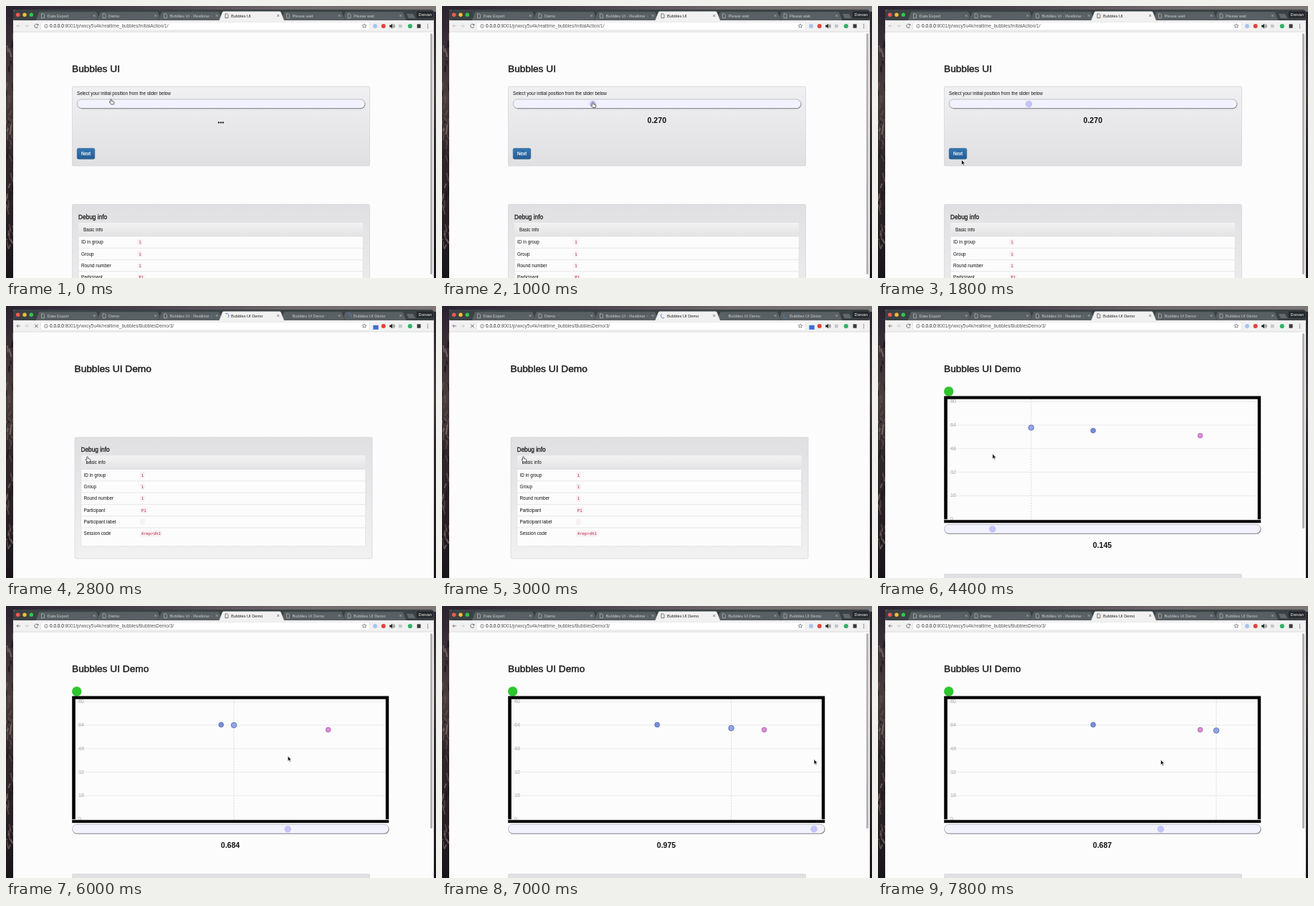
These frames come from a looping animation (600x379 px, 8 s). An HTML page:

```html
<!DOCTYPE html>
<html lang="en">
<head>
<meta charset="utf-8">
<title>Bubbles UI</title>
<style>
  html, body { margin: 0; width: 100%; height: 100%; overflow: hidden; background: #fff; }
  svg { display: block; width: 100vw; height: 100vh; }
  text { font: 6.3px "Liberation Sans", Arial, sans-serif; fill: #111; white-space: pre; }
  .title { font-size: 13.7px; fill: #1c1c1c; stroke: #1c1c1c; stroke-width: .45px; }
  .sub { font-size: 8.3px; fill: #1c1c1c; stroke: #1c1c1c; stroke-width: .28px; }
  .value { font-size: 10.6px; font-weight: bold; text-anchor: middle; }
  .code { font: 5.65px "DejaVu Sans Mono", monospace; fill: #c01f4a; }
  .tab { font-size: 5.65px; }
  .axis { font-size: 7.2px; fill: #a8a8a8; }
  .url { font-size: 6.5px; }
</style>
</head>
<body>
<svg id="stage" viewBox="0 0 600 379" preserveAspectRatio="none"></svg>
<script>
const LOOP = 8000, STEP = 200;

const rect = (x, y, w, h, fill, more = '') =>
  `<rect x="${x}" y="${y}" width="${w}" height="${h}" fill="${fill}" ${more}/>`;
const circle = (x, y, r, fill, more = '') =>
  `<circle cx="${x}" cy="${y}" r="${r}" fill="${fill}" ${more}/>`;
const path = (d, stroke, width = .8, more = 'fill="none"') =>
  `<path d="${d}" stroke="${stroke}" stroke-width="${width}" ${more}/>`;
const text = (x, y, s, cls = '', more = '') =>
  `<text x="${x}" y="${y}" class="${cls}" ${more}>${s}</text>`;
const group = (id, body, more = '') => `<g id="${id}" ${more}>${body}</g>`;
const gradient = (id, colors, dir = 'x2="0" y2="1"') =>
  `<linearGradient id="${id}" ${dir}>${colors.map((c, i) =>
    `<stop offset="${i / (colors.length - 1)}" stop-color="${c}"/>`).join('')}</linearGradient>`;
const range = n => [...Array(n).keys()];

const defs = `<defs>
  ${gradient('wall', ['#29222f', '#3b3036', '#4a3d3e', '#33292d', '#2c2428', '#241d22', '#17141a'])}
  ${gradient('wallTop', ['#29222f', '#4a434c', '#6f696b', '#7d7777'], '')}
  ${gradient('well', ['#f0f0f2', '#e0e0e2'])}
  ${gradient('debugWell', ['#e0e0e2', '#f1f1f2'])}
  ${gradient('head', ['#f2f2f3', '#e3e3e5'])}
  ${gradient('button', ['#3577b3', '#265c93'])}
</defs>`;

function wallpaper() {
  let seed = 7;
  const rnd = () => (seed = seed * 16807 % 2147483647) / 2147483647;
  const streaks = range(50).map(() => {
    const x = rnd() * 10, y = 30 + rnd() * 320;
    const tone = ['#8f7d78', '#151116', '#6a5756'][Math.floor(rnd() * 3)];
    return path(`M${x} ${y}l${rnd() * 8 - 4} ${4 + rnd() * 10}`, tone, 1 + rnd() * 1.5, 'opacity=".6"');
  }).join('');
  return rect(0, 0, 600, 379, 'url(#wall)') + rect(0, 0, 600, 8, 'url(#wallTop)') + streaks;
}

const tabX = i => 44 + 85.5 * i;

function tab(i) {
  const x = tabX(i), active = i === 3;
  const ink = active ? '#222' : '#c9cdcf';
  const shape = `M${x - 3} 20.5 L${x + 1.5} 9 Q${x + 2} 7.8 ${x + 3.5} 7.8 H${x + 81} Q${x + 82.5} 7.8 ${x + 83} 9 L${x + 87.5} 20.5Z`;
  return path(shape, active ? '#e9e9e9' : '#32373a', .5, `fill="${active ? '#f1f1f1' : '#596063'}"`)
    + group('doc' + i, path(`M${x + 5.5} 10.8h2.6l1.4 1.5v4.4h-4z`, ink, .6))
    + group('spin' + i, path(`M${x + 9.6} 16.4a3 3 0 0 1 -3 -5.4`, '#4a83d8', 1))
    + text(x + 13.6, 15.8, '', 'tab', `id="tab${i}" style="fill:${ink}"`)
    + (i === 2 ? rect(x + 70, 9, 6, 10, '#596063', 'opacity=".75"') : '')
    + path(`M${x + 77.7} 12l3 3m0-3l-3 3`, active ? '#555' : '#b3b8ba', .7);
}

function chrome() {
  const lights = ['#fb5a53', '#fdbb3b', '#32c748'].map((c, i) => circle(16.7 + 9.3 * i, 12.2, 2.7, c)).join('');
  const tabs = [0, 1, 2, 5, 4, 3].map(tab).join('');
  const nav = group('back', path('M20 27.8h-5m2-2.2l-2.2 2.2l2.2 2.2', '#666', .8))
    + path('M26 27.8h5m-2-2.2l2.2 2.2l-2.2 2.2', '#c6c6c6', .8)
    + group('reload', path('M44.6 26.4a2.6 2.6 0 1 0 .2 2.4m.1-3.8v1.9h-1.9', '#555', .8))
    + group('stop', path('M40.2 25.6l4.4 4.4m0-4.4l-4.4 4.4', '#555', .9));
  const tools = path('M500 24.8l.9 2h2.1l-1.7 1.4l.7 2.1l-2-1.3l-2 1.3l.7-2.1l-1.7-1.4h2.1z', '#555', .6)
    + group('extIdle', circle(515, 28, 3, '#a9c3ee'))
    + group('extBusy', rect(512.3, 26.8, 7.4, 6, '#3c6fd3'))
    + circle(526.7, 28, 3, '#e2433a')
    + path('M535.4 26.8h1.5l2-1.8v6l-2-1.8h-1.5z', '#222', .4, 'fill="#222"')
    + path('M540 26.4q1.4 1.6 0 3.2m1.2-4.4q2.2 2.8 0 5.6', '#222', .6)
    + rect(548, 25.7, 4.6, 4.6, '#c5c5c5') + circle(563.8, 28, 3.1, '#32b368')
    + rect(573.6, 25.3, 5, 5.4, '#3a3a3a')
    + [25.6, 28, 30.4].map(y => circle(588.5, y, .7, '#555')).join('');
  return rect(10, 5, 587, 380, '#fdfcfd', 'rx="3"') + rect(10, 5, 587, 16, '#3b4144', 'rx="3"')
    + lights + rect(573, 7.5, 23, 9, '#24282a', 'rx="1"')
    + text(584.7, 14, 'Dorvan', 'tab', 'text-anchor="middle" style="fill:#fff"')
    + path('M559 11h9l3 6h-9z', '#555c5f', .5, 'fill="#62696c"')
    + tabs + rect(10, 20, 587, 15.8, '#f1f1f1') + path('M10 36H597', '#c9c9c9', .6)
    + rect(48.5, 22.3, 459, 11.4, '#fff', 'rx="1.5" stroke="#d4d4d4" stroke-width=".5"')
    + nav + circle(56, 28, 2.5, 'none', 'stroke="#555" stroke-width=".6"') + path('M56 27.6v1.8m0-3.1v.7', '#555', .7)
    + `<text x="61" y="30.3" class="url">0.0.0.0<tspan id="url" fill="#555"></tspan></text>` + tools;
}

function slider(x, y, w) {
  return rect(x + .4, y + .6, w, 12.6, '#55555c', 'rx="6.3"')
    + rect(x, y, w, 12.6, '#f2f2fd', 'rx="6.3" stroke="#8a8a92" stroke-width=".5"');
}
const handle = (id, y) => circle(0, y, 4.4, '#c4c4f8', `id="${id}" stroke="#b3b3ee" stroke-width=".5"`);

function debugInfo() {
  const rows = [['ID in group', '1'], ['Group', '1'], ['Round number', '1'],
    ['Participant', 'P1'], ['Participant label', ' '], ['Session code', '4reprdh1']];
  const pitch = 16.3;
  return rect(92.5, 276.5, 415, 169, 'url(#debugWell)', 'rx="1.5" stroke="#d2d2d4" stroke-width=".7"')
    + text(101, 296.6, 'Debug info', 'sub')
    + rect(101.2, 301.8, 397, 126.5, '#fdfcfd', 'rx="1.5" stroke="#d8d8da" stroke-width=".6"')
    + rect(101.5, 302, 396.4, 19, 'url(#head)') + text(108, 313.6, 'Basic info')
    + rows.map(([label, code], i) => {
      const y = 321 + pitch * i;
      return path(`M101.5 ${y}H498`, '#d9d9d9', .6) + text(105, y + 10.3, label)
        + rect(183.4, y + 3.8, code.length * 3.4 + 3.4, 8.6, '#f8f1f3', 'rx="1.2"')
        + text(185.3, y + 10.2, code, 'code');
    }).join('');
}

function choicePage() {
  return text(92, 92, 'Bubbles UI', 'title')
    + rect(92.5, 112.3, 415, 110.5, 'url(#well)', 'rx="1.5" stroke="#d2d2d4" stroke-width=".7"')
    + text(99, 123.6, 'Select your initial position from the slider below')
    + slider(99.3, 130, 401.6) + handle('pick', 136.6)
    + group('dots', [296.8, 299.8, 302.8].map(x => circle(x, 162.4, 1.15, '#111')).join(''))
    + text(299.8, 163.4, '0.270', 'value', 'id="picked"')
    + rect(99.2, 198.3, 24.6, 15, 'url(#button)', 'rx="2" stroke="#245580" stroke-width=".5" id="next"')
    + text(105, 208.2, 'Next', '', 'style="fill:#fff;stroke:#fff;stroke-width:.2px"');
}

function chartPage() {
  const tickY = i => 297 - 32.75 * i;
  const tick = i => text(101, tickY(i) + 2.2, 16 * i, 'axis');
  return text(92, 92, 'Bubbles UI Demo', 'title') + circle(98.7, 119, 6.7, '#f00', 'id="status"')
    + group('grid', range(6).map(i => path(`M97 ${tickY(i)}H530`, '#e3e3e6', .7) + tick(i)).join(''))
    + group('zero', tick(0))
    + group('bubbles', path('M0 130V298', '#cfcfd3', .8, 'id="guide" stroke-dasharray="2 1.6"')
      + circle(300.2, 0, 3.4, '#7590dc', 'id="peerA" stroke="#4e609c" stroke-width=".7"')
      + circle(449.6, 0, 3.4, '#dd8bdd', 'id="peerB" stroke="#985f9a" stroke-width=".7"')
      + circle(0, 0, 3.8, '#92a6ec', 'id="own" stroke="#5365a6" stroke-width=".8"'))
    + path('M92.2 297.2V125.4H534.2V297.2H529.8V129.8H96.8V297.2Z', 'none', 0, 'fill="#000"')
    + rect(92.2, 298.2, 442, 4, '#000')
    + slider(92.5, 304.3, 441.5) + handle('knob', 310.8)
    + text(313, 337.3, '', 'value', 'id="live"');
}

const cursors = group('arrow', path('M0 0V7.2L1.7 5.7L2.8 8.2L4 7.7L2.9 5.2H5.1Z', '#fff', .6, 'fill="#111"'))
  + group('hand', path('M-.9 .6q.9-1.3 1.7 0v2.3l2.8 .6q.9 .3 .8 1.3l-.6 2.6h-3.9l-2.4-3q.2-1.1 1.6-.2z', '#222', .7, 'fill="#fff"'));

const stage = document.getElementById('stage');
stage.innerHTML = defs + wallpaper() + chrome()
  + group('choice', choicePage()) + group('chart', chartPage())
  + text(95.5, 92, 'Bubbles UI Demo', 'title', 'id="loadingTitle"')
  + group('debug', debugInfo()) + rect(592, 38, 3.2, 300, '#b4b4b6', 'rx="1.6" id="scroll"') + cursors;

const $ = id => document.getElementById(id);
const show = (id, on) => { $(id).style.display = on ? '' : 'none'; };
const set = (id, attrs) => { for (const k in attrs) $(id).setAttribute(k, attrs[k]); };
const label = (id, s) => { $(id).textContent = s; };

// Each track: [time, value, ...]; linear between entries.
function at(track, t) {
  const i = track.findIndex(k => k[0] > t);
  if (i === 0) return track[0].slice(1);
  if (i < 0) return track[track.length - 1].slice(1);
  const a = track[i - 1], b = track[i], f = (t - a[0]) / (b[0] - a[0]);
  return a.slice(1).map((v, j) => v + (b[j + 1] - v) * f);
}

const pointer = [[0, 146.6, 129.6], [200, 150, 131], [800, 210.5, 134], [1000, 210.5, 134], [1400, 150, 186],
  [1800, 116.5, 214.3], [2000, 113.5, 209.8], [3400, 113.5, 209.8], [3800, 130, 210], [4200, 156, 207],
  [4400, 159.8, 206], [4600, 176, 206], [5400, 350, 208], [6000, 393.2, 209], [6600, 490, 212],
  [6800, 519, 213], [7200, 519, 214], [7600, 430, 214], [7800, 394.5, 214.3]];
const ownTrack = [[4000, 213.7, 169.5], [4800, 213.7, 169.5], [6000, 318, 166], [7800, 472, 173.5]];
const peerTrack = [[4000, 173.6, 180.7], [4800, 173.6, 180.7], [5600, 165.5, 172.5]];

function draw(t) {
  const choosing = t < 2600, loading = t >= 2600 && t < 3400, charting = t >= 3400;
  const picked = t >= 800, running = t >= 4000, busy = t >= 2400 && t < 3400;
  const [px, py] = at(pointer, t);

  show('choice', choosing);
  show('loadingTitle', loading);
  show('chart', charting);
  set('debug', { transform: loading ? 'translate(3.5 -93.5)' : `translate(0 ${charting ? 97 : 0})` });
  show('scroll', !loading);
  set('scroll', { height: charting ? 272 : 336 });
  set('back', { opacity: choosing ? .35 : 1 });

  const open = choosing ? 'Bubbles UI' : 'Bubbles UI Demo', waiting = choosing ? 'Please wait' : open;
  ['Data Export', 'Demo', 'Bubbles UI - Realtime s', open, waiting, waiting].forEach((s, i) => {
    const spinning = i > 2 && busy;
    label('tab' + i, s);
    show('doc' + i, !spinning);
    show('spin' + i, spinning && i !== 4);
    set('spin' + i, { transform: `rotate(${(t - 3000) * .9} ${tabX(i) + 7.7} 13.6)` });
  });
  label('url', ':8001/p/wxcy5u4k/realtime_bubbles/' + (choosing ? 'InitialAction/1/' : 'BubblesDemo/3/'));
  show('reload', !busy);
  show('stop', busy);
  const extBusy = t >= 2600 && !running;
  show('extBusy', extBusy);
  show('extIdle', !extBusy);

  show('pick', picked);
  show('picked', picked);
  show('dots', !picked);
  set('pick', { cx: 210.5 });
  set('next', { opacity: t >= 2000 ? .93 : 1 });

  set('status', { fill: running ? '#2ec62e' : '#f30000' });
  show('grid', running);
  show('zero', !running);
  show('bubbles', running);
  const [ox, oy] = at(ownTrack, t), [ya, yb] = at(peerTrack, t);
  set('own', { cx: ox, cy: oy });
  set('guide', { transform: `translate(${ox} 0)` });
  set('peerA', { cy: ya });
  set('peerB', { cy: yb });
  const knob = running ? px : 214.5;
  set('knob', { cx: knob });
  label('live', running ? ((knob - 97) / 433).toFixed(3) : '0.27');

  const hand = t < 1200 || (t >= 2000 && t < 3800);
  show('hand', hand);
  show('arrow', !hand);
  set(hand ? 'hand' : 'arrow', { transform: `translate(${px} ${py})` });
}

const start = performance.now();
function tick() {
  const t = (performance.now() - start) % LOOP;
  draw(Math.floor(t / STEP) * STEP);
  requestAnimationFrame(tick);
}
tick();
</script>
</body>
</html>
```
